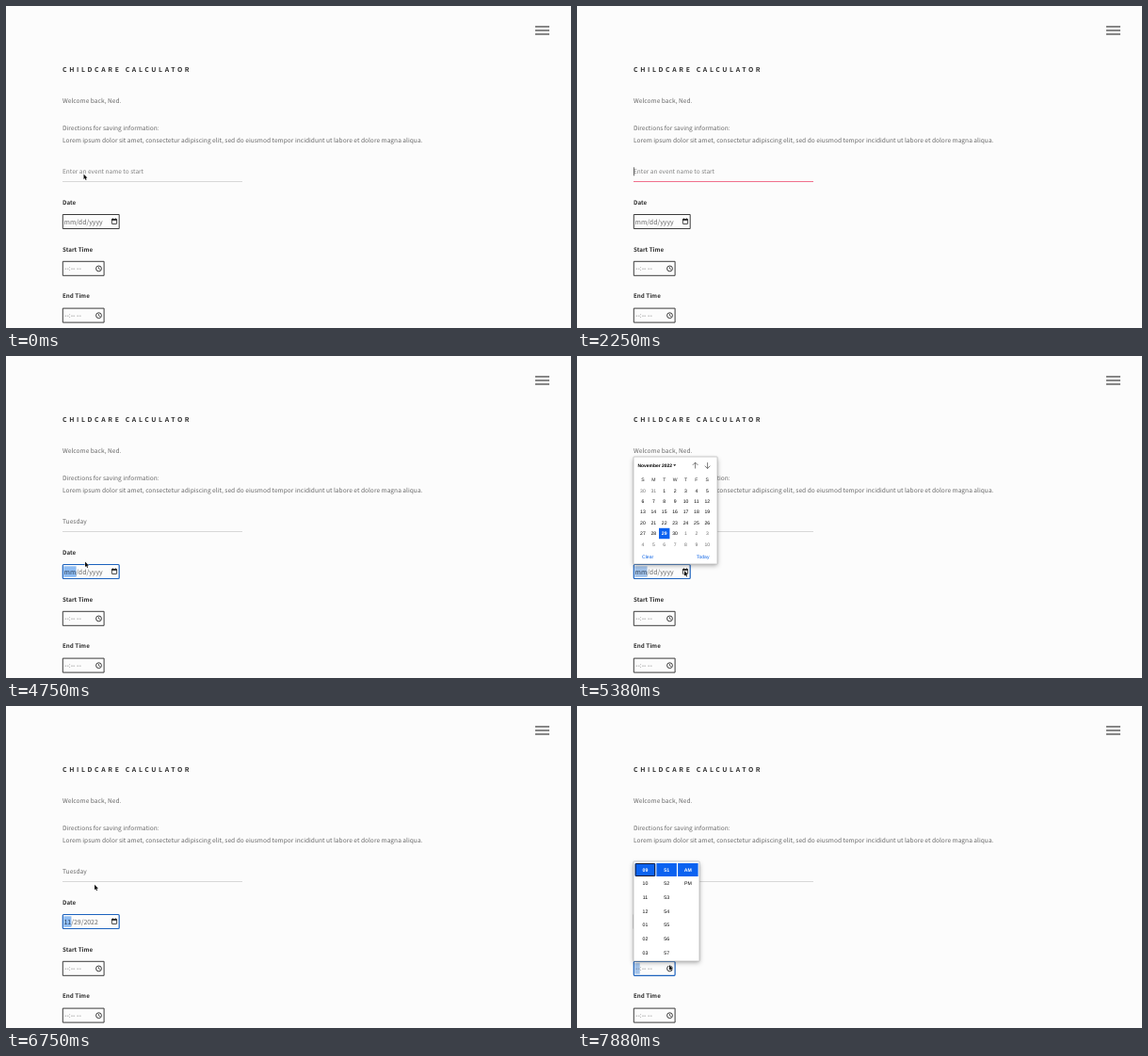
Write an HTML page with a canvas that moves like this. It is 600 px wide and 342 px high and loops after 8 s.

```html
<!DOCTYPE html>
<html lang="en">
<head>
<meta charset="utf-8">
<title>Childcare calculator</title>
<style>
html, body { margin: 0; width: 100%; height: 100%; overflow: hidden; background: #fcfcfc; }
canvas { display: block; width: 100vw; height: 100vh; }
</style>
</head>
<body>
<canvas id="stage" width="600" height="342"></canvas>
<script>
const ctx = document.getElementById('stage').getContext('2d');
const LOOP = 8000;
const BODY = '"Noto Sans CJK JP", "Noto Sans CJK SC", "Noto Sans CJK", sans-serif';
const UI = '"Liberation Sans", Arial, sans-serif';
const BODY_SIZE = 6.615;
const INK = '#2e2e2e', SOFT = '#666', BLUE = '#0b62f0', RING = '#1c62bd', MARK = '#a3c3ea';

// Each entry holds until the next one starts: [time, value]
const typed = [[0, ''], [1250, 'Tu'], [1750, 'T'], [2000, ''], [2500, 'T'], [2750, 'Tu'],
  [2880, 'Tue'], [3000, 'Tues'], [3250, 'Tuesd'], [3380, 'Tuesda'], [3630, 'Tuesday']];
const caret = [[0, 0], [380, 1], [880, 0.4], [1000, 0], [1250, 1], [1750, 0], [2250, 1], [4130, 0]];
const focus = [[0, ''], [380, 'name'], [4130, ''], [4250, 'date'], [7750, 'time']];
const popup = [[0, ''], [5250, 'calendar'], [6750, ''], [7750, 'clock']];
const pointer = [[0, [82.5, 178.5]], [380, null], [4000, [83, 181]], [4130, [83, 203]],
  [4250, [84, 222]], [4630, [84, 220]], [4750, [84, 218.5]], [4880, [95, 223]],
  [5000, [108, 227]], [5130, [114, 228]], [5500, [116, 221]], [5630, [118, 212]],
  [5750, [110, 205]], [5880, [101, 202]], [6000, [94, 200]], [6250, [94, 198]],
  [6380, [94, 194]], [6500, [94, 189.7]], [6880, [94, 194]], [7000, [95, 208]],
  [7130, [96, 230]], [7250, [97, 253]], [7380, [98, 269]], [7500, [98, 275]]];

const at = (track, t) => track.filter(k => k[0] <= t).pop()[1];

// Large font under a small scale keeps fractional glyph positions
function setFont(size, weight, family, spacing = 0) {
  ctx.font = `${weight} ${size * 10}px ${family}`;
  ctx.letterSpacing = spacing * 10 + 'px';
  ctx.textRendering = 'geometricPrecision';
}

function text(str, x, y, { size = BODY_SIZE, weight = 400, family = BODY, color = SOFT, align = 'left', spacing = 0 } = {}) {
  ctx.save();
  ctx.translate(x, y);
  ctx.scale(0.1, 0.1);
  setFont(size, weight, family, spacing);
  ctx.textAlign = align;
  ctx.fillStyle = color;
  ctx.fillText(str, 0, 0);
  ctx.restore();
}

function widthOf(str, size) {
  ctx.save();
  setFont(size, 400, BODY);
  const w = ctx.measureText(str).width / 10;
  ctx.restore();
  return w;
}

function rect(x, y, w, h, color) {
  ctx.fillStyle = color;
  ctx.fillRect(x, y, w, h);
}

function line(points, color, width) {
  ctx.beginPath();
  points.forEach(([x, y]) => ctx.lineTo(x, y));
  ctx.strokeStyle = color;
  ctx.lineWidth = width;
  ctx.stroke();
}

function frame(x, y, w, h, color, width, radius = 0) {
  ctx.beginPath();
  ctx.roundRect(x, y, w, h, radius);
  ctx.strokeStyle = color;
  ctx.lineWidth = width;
  ctx.stroke();
}

function field(y, w, focused) {
  frame(60.3, y, w, 15, focused ? RING : '#3c3c3c', focused ? 1.2 : 1, focused ? 1 : 0);
}

function page() {
  rect(0, 0, 600, 342, '#fcfcfc');
  for (const y of [21.3, 25.3, 29.3]) rect(562, y, 15, 1.3, '#4a4a4a');

  text('CHILDCARE CALCULATOR', 60, 70.3, { size: 6.9, weight: 700, color: INK, spacing: 2.63 });
  text('Welcome back, Ned.', 60, 103.2);
  text('Directions for saving information:', 60, 131.5);
  text('Lorem ipsum dolor sit amet, consectetur adipiscing elit, sed do eiusmod ' +
    'tempor incididunt ut labore et dolore magna aliqua.', 60, 144.7);
  [['Date', 210.8], ['Start Time', 260.5], ['End Time', 310.4]].forEach(([label, y]) =>
    text(label, 60, y, { size: 6.25, weight: 700, color: INK }));
}

function nameField(t, focused) {
  const value = at(typed, t);
  if (value) text(value, 60, 178.3);
  else text('Enter an event name to start', 60, 178.3, { size: 6.54, color: '#808080' });
  rect(60, 186, 191, 1, focused ? '#f0708c' : '#d8d8d8');
  ctx.globalAlpha = at(caret, t);
  rect(60 + widthOf(value, BODY_SIZE), 171.3, 0.8, 9, '#444');
  ctx.globalAlpha = 1;
}

function dateField(t, focused, open) {
  const [first, rest] = t >= 6750 ? ['11', '/29/2022'] : ['mm', '/dd/yyyy'];
  const size = 6.95, x = 61.5, w = widthOf(first, size);
  field(221.5, 59.9, focused);
  if (focused) rect(x - 0.2, 223.3, w + 0.4, 11.5, open ? MARK : '#8dbcf3');
  text(first, x, 231.7, { size, color: focused ? '#2b3d55' : SOFT });
  text(rest, x + w, 231.7, { size });
  frame(112.4, 226.6, 5.2, 4.9, '#222', 0.8, 0.4);
  rect(112.2, 226.1, 5.6, 1.7, '#222');
  rect(113, 225.4, 0.8, 1, '#222');
  rect(116.2, 225.4, 0.8, 1, '#222');
}

function timeField(y, focused) {
  field(y, 43.8, focused);
  if (focused) rect(61.3, y + 1.8, 5.4, 11.5, MARK);
  text('--:-- --', 62, y + 10.1, { size: 6.9, color: SOFT });
  ctx.beginPath();
  ctx.arc(98.5, y + 7.6, 2.9, 0, 7);
  ctx.strokeStyle = '#222';
  ctx.lineWidth = 0.9;
  ctx.stroke();
  line([[98.5, y + 5.9], [98.5, y + 7.8], [99.9, y + 8.6]], '#222', 0.7);
}

function panel(x, y, w, h) {
  ctx.save();
  ctx.shadowColor = 'rgba(0,0,0,0.35)';
  ctx.shadowBlur = 5;
  ctx.shadowOffsetY = 1.5;
  rect(x, y, w, h, '#fff');
  ctx.restore();
  frame(x, y, w, h, '#b4b4b4', 0.7, 0.5);
}

function arrow(x, dir) {
  const tip = 116.3 - dir * 3.2;
  line([[x, 116.3 + dir * 3.2], [x, tip]], '#444', 0.7);
  line([[x - 2.8, tip + dir * 2.8], [x, tip], [x + 2.8, tip + dir * 2.8]], '#444', 0.7);
}

function calendar(tip) {
  const step = 11.4, left = 64.2, top = 137.2;
  const label = (str, x, y, opts) => text(str, x, y, { size: 5.1, family: UI, color: '#000', ...opts });
  panel(60, 107, 89, 114);
  label('November 2022', 64.5, 117.8, { weight: 700, size: 4.95 });
  ctx.beginPath();
  ctx.moveTo(102.2, 115.3);
  ctx.lineTo(105.2, 115.3);
  ctx.lineTo(103.7, 117);
  ctx.fillStyle = '#111';
  ctx.fill();
  arrow(125.6, 1);
  arrow(138.6, -1);
  [...'SMTWTFS'].forEach((d, i) =>
    label(d, left + (i + 0.5) * step, 132.9, { align: 'center', color: '#222' }));

  const hoverCol = Math.floor((tip[0] - left) / step);
  const hoverRow = Math.floor((tip[1] - top) / step);
  for (let i = 0; i < 42; i++) {
    const col = i % 7, row = Math.floor(i / 7), day = i - 1;
    const x = left + col * step, y = top + row * step;
    const shown = day < 1 ? day + 31 : day > 30 ? day - 30 : day;
    const today = day === 29;
    if (today) rect(x, y, step, step, BLUE);
    else if (col === hoverCol && row === hoverRow) {
      rect(x, y, step, step, '#b5cdf7');
      frame(x + 0.4, y + 0.4, step - 0.8, step - 0.8, '#32568f', 0.8, 0.5);
    }
    label(String(shown), x + step / 2, y + 7.4, {
      align: 'center',
      weight: today ? 700 : 400,
      color: today ? '#fff' : day === shown ? '#000' : '#6c6c6c'
    });
  }
  label('Clear', 69, 214.5, { color: '#0b62e4' });
  label('Today', 126.9, 214.5, { color: '#0b62e4' });
}

function clockPanel() {
  const columns = [
    ['09', '10', '11', '12', '01', '02', '03'],
    ['51', '52', '53', '54', '55', '56', '57'],
    ['AM', 'PM']
  ];
  panel(60, 165, 70, 106);
  columns.forEach((items, c) => {
    const x = 61.7 + c * 22.7;
    rect(x, 167, 21.5, 14, BLUE);
    if (c === 0) frame(x + 0.5, 167.5, 20.5, 13, '#101c38', 1, 0.8);
    items.forEach((str, r) => text(str, x + 10.75, 175.8 + r * 14.67, {
      size: 5.2, family: UI, align: 'center',
      weight: r ? 400 : 700, color: r ? '#000' : '#fff'
    }));
  });
}

function drawPointer([x, y]) {
  ctx.beginPath();
  [[0, 0], [0, 5.6], [1.3, 4.5], [2.2, 6.5], [3.1, 6.1], [2.3, 4.2], [3.9, 4.1]]
    .forEach(([dx, dy]) => ctx.lineTo(x + dx, y + dy));
  ctx.closePath();
  ctx.strokeStyle = '#fff';
  ctx.lineWidth = 0.9;
  ctx.stroke();
  ctx.fillStyle = '#111';
  ctx.fill();
}

function draw(now) {
  const t = now % LOOP;
  const active = at(focus, t), open = at(popup, t), tip = at(pointer, t);
  page();
  nameField(t, active === 'name');
  dateField(t, active === 'date', open === 'calendar');
  timeField(271.3, active === 'time');
  timeField(321.1, false);
  if (open === 'calendar') calendar(tip);
  if (open === 'clock') clockPanel();
  if (tip) drawPointer(tip);
  requestAnimationFrame(() => draw(performance.now()));
}

draw(0);
</script>
</body>
</html>
```
